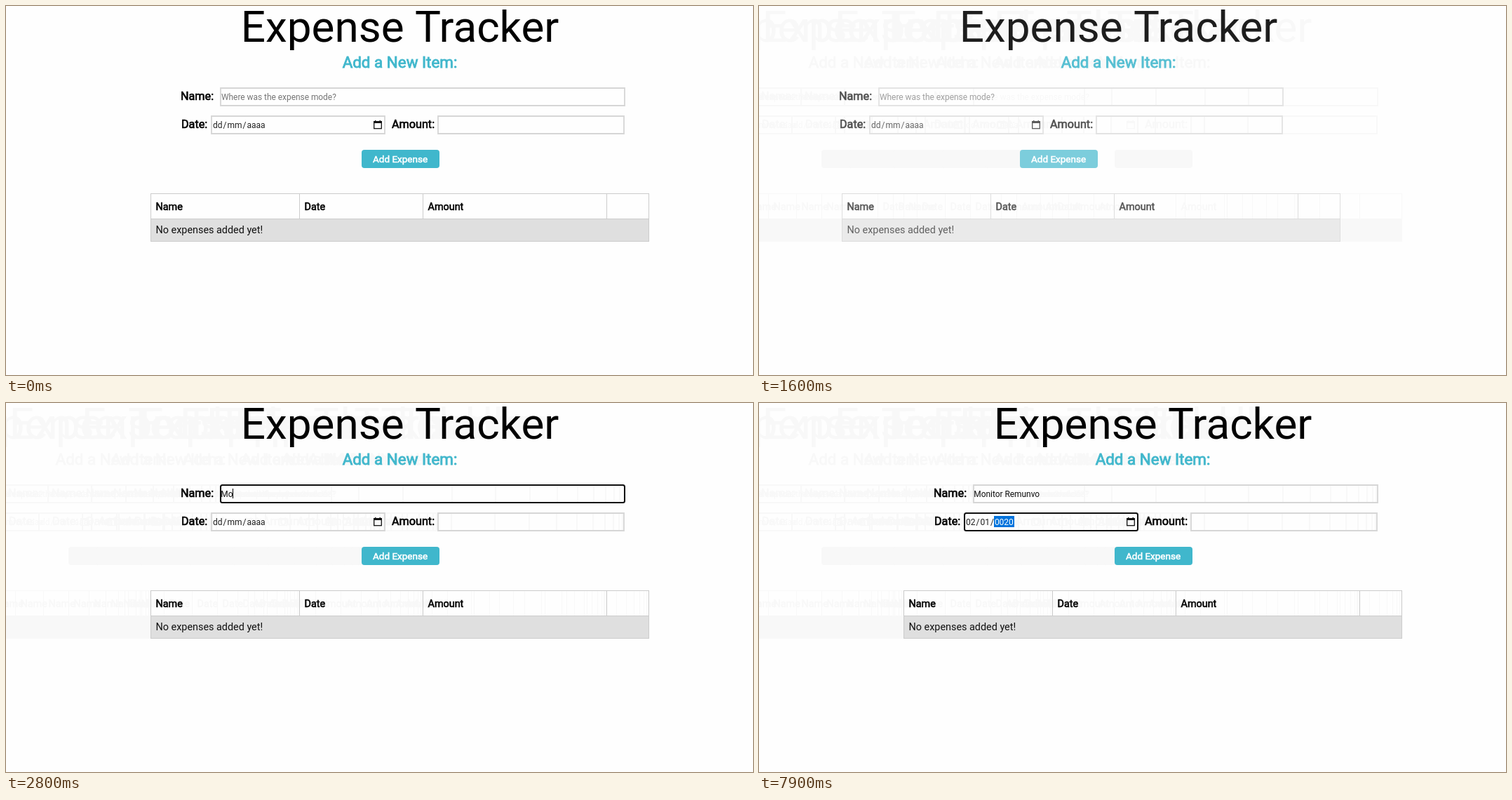
Animation, 1065 px wide and 526 px high, one loop 8000 ms. Source, as an HTML page with a canvas:

```html
<!DOCTYPE html>
<html lang="en">
<head>
<meta charset="utf-8">
<title>Expense Tracker</title>
<style>
  html, body { margin: 0; width: 100%; height: 100%; overflow: hidden; background: #fefefe; }
  canvas { display: block; }
</style>
</head>
<body>
<canvas id="stage" width="1065" height="526"></canvas>
<script>
const ctx = document.getElementById('stage').getContext('2d');
const LOOP = 8000, STEP = 100, ENTER = 1100, SETTLED = 2600;
const PAPER = '#fefefe', TRAIL = '#f8f8f8', TEAL = '#40b7cc', BORDER = '#d6d6d6';

// [time, text in the name field]
const typing = [
  [0, ''], [2600, 'M'], [2800, 'Mo'], [2900, 'Mon'], [3100, 'Monit'], [3200, 'Monito'],
  [3300, 'Monitor'], [3500, 'Monitor '], [3900, 'Monitor R'], [4100, 'Monitor Re'],
  [4600, 'Monitor Re m'], [5000, 'Monitor Re '], [5100, 'Monitor Re'], [5300, 'Monitor Remu'],
  [5500, 'Monitor Remun'], [5600, 'Monitor Remunv'], [5700, 'Monitor Remunvo'],
];
// [time, day, month, year, selected part]
const dates = [
  [0, 'dd', 'mm', 'aaaa', -1], [6600, 'dd', 'mm', 'aaaa', 0], [6800, '00', 'mm', 'aaaa', 0],
  [6900, '02', 'mm', 'aaaa', 1], [7100, '02', '00', 'aaaa', 1], [7400, '02', '01', 'aaaa', 2],
  [7700, '02', '01', '0002', 2], [7900, '02', '01', '0020', 2],
];
const groups = [
  { distance: 430, start: 1040, duration: 930, draw: drawHeading },
  { distance: 430, start: 1040, duration: 1390, draw: drawForm },
  { distance: 255, start: 1040, duration: 1465, draw: drawTable },
];

let trail = false, opacity = 1;
const ink = color => trail ? TRAIL : `color-mix(in srgb, ${color} ${opacity * 100}%, ${PAPER})`;
const latest = (list, t) => list.filter(entry => entry[0] <= t).pop();

// cubic-bezier(.25, .1, .25, 1)
function ease(x) {
  if (x <= 0) return 0;
  if (x >= 1) return 1;
  const curve = (s, a, b) => 3 * a * s * (1 - s) ** 2 + 3 * b * s * s * (1 - s) + s ** 3;
  let low = 0, high = 1;
  for (let i = 0; i < 24; i++) {
    const mid = (low + high) / 2;
    if (curve(mid, .25, .25) < x) low = mid; else high = mid;
  }
  return curve(low, .1, 1);
}

function text(str, x, y, size, color = '#000', bold = false) {
  ctx.font = `${size}px Roboto, sans-serif`;
  ctx.fillStyle = ctx.strokeStyle = ink(color);
  ctx.fillText(str, x, y);
  if (bold) {
    ctx.lineWidth = size / 25;
    ctx.strokeText(str, x, y);
  }
  return ctx.measureText(str).width;
}

function rect(x, y, w, h, color) {
  ctx.fillStyle = ink(color);
  ctx.fillRect(x, y, w, h);
}

function field(x, y, w, focused) {
  ctx.strokeStyle = ink(focused ? '#101010' : BORDER);
  ctx.lineWidth = focused ? 2 : 1.8;
  ctx.beginPath();
  ctx.roundRect(x + 1, y + 1, w - 2, 25, focused ? 2.5 : 0);
  ctx.stroke();
}

function drawHeading() {
  ctx.textAlign = 'center';
  text('Expense Tracker', 561.5, 51, 62);
  text('Add a New Item:', 561.5, 88, 22.4, TEAL, true);
  ctx.textAlign = 'left';
}

function drawName(t) {
  const value = latest(typing, t)[1];
  const focused = t >= 2500 && t < 6600;
  field(305, 116, 578, focused);
  if (!value) text('Where was the expense mode?', 307, 134, 11.9, '#757575');
  const width = text(value, 306.3, 134, 11.9, '#111');
  if (focused && t < 6100) rect(Math.round(306.3 + width), 122, 1, 14, '#000');
  if (value.startsWith('Monitor Re ')) {
    ctx.strokeStyle = '#e03030';
    ctx.lineWidth = 1;
    ctx.beginPath();
    for (let x = 351; x <= 365; x++) ctx.lineTo(x, 135.5 + Math.sin(x * 1.57));
    ctx.stroke();
  }
}

function drawDate(t) {
  const [, day, month, year, selected] = latest(dates, t);
  field(292, 156, 249, selected >= 0);
  ctx.font = '12px Roboto, sans-serif';
  let x = 295;
  [day, month, year].forEach((part, i) => {
    const active = i === selected;
    const width = ctx.measureText(part).width;
    if (active) rect(Math.round(x - 1), 161, Math.round(width + 2), 16, '#0073dc');
    text(part, x, 174, 12, active ? '#fff' : '#222');
    x += width + 1;
    if (i < 2) x += text('/', x, 174, 12, '#222') + 1;
  });
  // calendar icon
  ctx.strokeStyle = ink('#111');
  ctx.lineWidth = 1.3;
  ctx.strokeRect(524.7, 164.7, 10.6, 10);
  rect(524, 164, 12, 3, '#111');
  rect(526, 163, 1.4, 2, '#111');
  rect(532.6, 163, 1.4, 2, '#111');
}

function drawForm(t) {
  text('Name:', 249, 134, 16.2, '#000', true);
  drawName(t);
  text('Date:', 250, 174, 16.2, '#000', true);
  drawDate(t);
  text('Amount:', 550, 174, 16.2, '#000', true);
  field(615, 156, 267, false);

  ctx.fillStyle = ink(TEAL);
  ctx.beginPath();
  ctx.roundRect(507, 205, 111, 26, 4);
  ctx.fill();
  text('Add Expense', 523, 223, 13.5, '#fff', true);
}

function drawTable() {
  rect(206, 303, 711, 32, '#dfdfdf');
  for (const y of [267, 303, 335]) rect(206, y, 711, 1, '#ccc');
  for (const x of [206, 418, 594, 856, 916]) rect(x, 267, 1, 36, '#ccc');
  for (const x of [206, 916]) rect(x, 303, 1, 32, '#ccc');
  text('Name', 213.5, 290.5, 14.4, '#000', true);
  text('Date', 425.5, 290.5, 14.4, '#000', true);
  text('Amount', 601.5, 290.5, 14.4, '#000', true);
  text('No expenses added yet!', 213.5, 324, 14.4, '#111');
}

function drawPage(t) {
  for (const { distance, start, duration, draw } of groups) {
    opacity = t < ENTER ? 1 : ease((t - start) / duration);
    ctx.save();
    ctx.translate(-Math.round(distance * (1 - opacity)), 0);
    draw(t);
    ctx.restore();
  }
}

function render(now) {
  const t = Math.floor(now % LOOP / STEP) * STEP;
  ctx.fillStyle = PAPER;
  ctx.fillRect(0, 0, 1065, 526);
  // every earlier pose leaves a faint trace
  trail = true;
  if (t >= ENTER) {
    for (let s = ENTER - STEP; s < Math.min(t, SETTLED - STEP); s += STEP) drawPage(s);
  }
  trail = false;
  drawPage(t);
}

const begin = performance.now();
(function frame() {
  render(performance.now() - begin);
  requestAnimationFrame(frame);
})();
</script>
</body>
</html>
```
